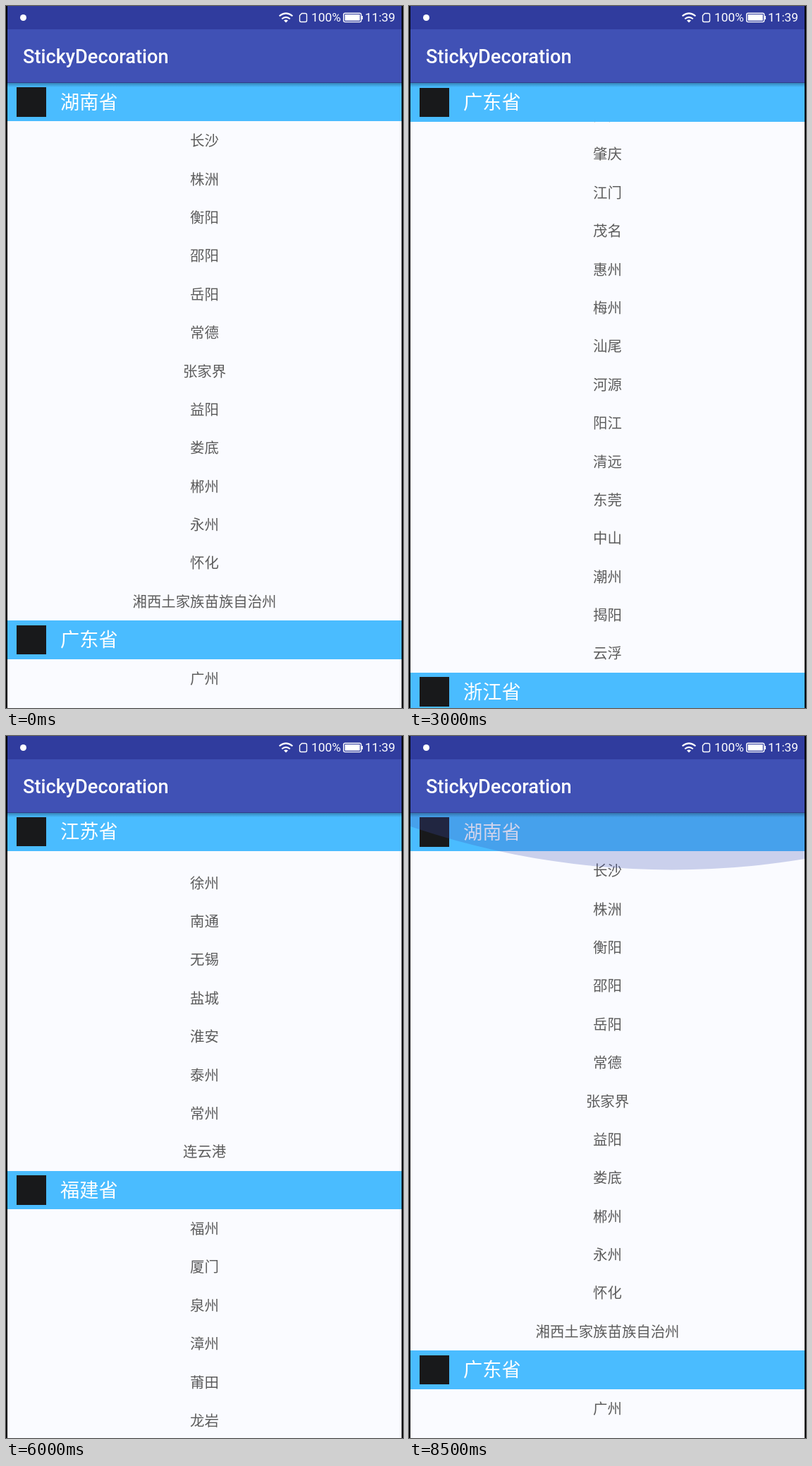
These frames come from a looping animation (563x994 px, 9000 ms). An HTML page:

```html
<!DOCTYPE html>
<html lang="zh-CN">
<head>
<meta charset="utf-8">
<title>StickyDecoration</title>
<style>
  html, body { margin: 0; width: 100%; height: 100%; overflow: hidden; background: #000; }
  #stage { position: relative; width: 563px; height: 994px; overflow: hidden; background: #000; }
  #list {
    position: absolute; left: 2px; top: 108.8px; width: 559px; height: 885.2px;
    overflow: hidden; background: #fafbff; color: #5c5c5c;
    font: 20.4px "Noto Sans CJK SC", "Noto Sans CJK", sans-serif;
  }
  #list div, #list h2 { box-sizing: border-box; height: 54.4px; margin: 0; white-space: nowrap; }
  #list div { line-height: 52.2px; text-align: center; }
  #list h2 {
    position: sticky; top: 0; padding-left: 75px; background: #4abcff; color: #fff;
    font-size: 27.2px; font-weight: 400; line-height: 51.4px;
  }
  #list h2::before {
    content: ""; position: absolute; left: 13px; top: 6.4px; width: 42px; height: 41.5px; background: #18191b;
  }
  svg { position: absolute; left: 0; top: 0; }
  text { font-family: Roboto, sans-serif; fill: #fff; }
</style>
</head>
<body>
<div id="stage">
  <div id="list"></div>
  <svg width="563" height="994" viewBox="0 0 563 994">
    <defs>
      <linearGradient id="shade" x2="0" y2="1">
        <stop stop-color="#123" stop-opacity=".38"/>
        <stop offset="1" stop-color="#123" stop-opacity="0"/>
      </linearGradient>
      <clipPath id="listArea"><path d="M2 108.8H561V994H2z"/></clipPath>
    </defs>
    <g clip-path="url(#listArea)">
      <circle id="glow" cx="373" cy="-960.5" r="1150" fill="#3f51b5" fill-opacity=".25"/>
    </g>
    <path d="M2 108.5H561V115H2z" fill="url(#shade)"/>
    <path d="M2 33H561V108.8H2z" fill="#4051b5"/>
    <path d="M2 0H561V33H2z" fill="#303c9e"/>
    <text x="24" y="81.3" font-size="27.2" font-weight="500">StickyDecoration</text>
    <g font-size="17.3">
      <text x="433" y="22.3">100%</text>
      <text x="509" y="22.3">11:39</text>
    </g>
    <circle cx="24.5" cy="16.5" r="4.5" fill="#fff"/>
    <g fill="none" stroke="#fff" stroke-width="2">
      <path d="M387.6 14.2q9.4-7.6 18.8 0M391.2 18.2q5.8-4.6 11.6 0"/>
      <path d="M419.5 10.5h5q2 0 2 2v8q0 2-2 2h-6q-2 0-2-2v-7z" stroke-width="1.4"/>
      <rect x="478.7" y="10.2" width="25" height="12.4" rx="2" stroke-width="1.4"/>
    </g>
    <path d="M394 20.6q3-2 6 0l-3 3zM480.6 12h21.2v8.8h-21.2zM504.4 14h1.6v5h-1.6z" fill="#fff"/>
  </svg>
</div>
<script>
  const provinces = {
    湖南省: "长沙 株洲 衡阳 邵阳 岳阳 常德 张家界 益阳 娄底 郴州 永州 怀化 湘西土家族苗族自治州",
    广东省: "广州 深圳 珠海 汕头 佛山 韶关 湛江 肇庆 江门 茂名 惠州 梅州 汕尾 河源 阳江 清远 东莞 中山 潮州 揭阳 云浮",
    浙江省: "杭州 宁波 温州 嘉兴 绍兴 金华 湖州 舟山",
    江苏省: "南京 苏州 徐州 南通 无锡 盐城 淮安 泰州 常州 连云港",
    福建省: "福州 厦门 泉州 漳州 莆田 龙岩 三明 南平 宁德"
  };
  const list = document.getElementById("list");
  const glow = document.getElementById("glow");

  list.innerHTML = Object.entries(provinces).map(([name, cities]) =>
    `<section><h2>${name}</h2>${cities.split(" ").map(city => `<div>${city}</div>`).join("")}</section>`
  ).join("");

  // The screen refreshes twice a second; each entry is the scroll offset held for one step.
  const STEP = 500;
  const offsets = [
    0, 264, 577, 733.6, 800, 937, 1123, 1680, 1888.4,
    2243, 2376.8, 2585, 2539, 2425, 1955.4, 1155, 339, 0
  ];

  function draw(now) {
    const step = Math.floor(now / STEP) % offsets.length;
    list.scrollTop = offsets[step];
    // Overscroll glow when the fling hits the top.
    glow.style.display = step === offsets.length - 1 ? "" : "none";
    requestAnimationFrame(() => draw(performance.now()));
  }
  draw(performance.now());
</script>
</body>
</html>
```
